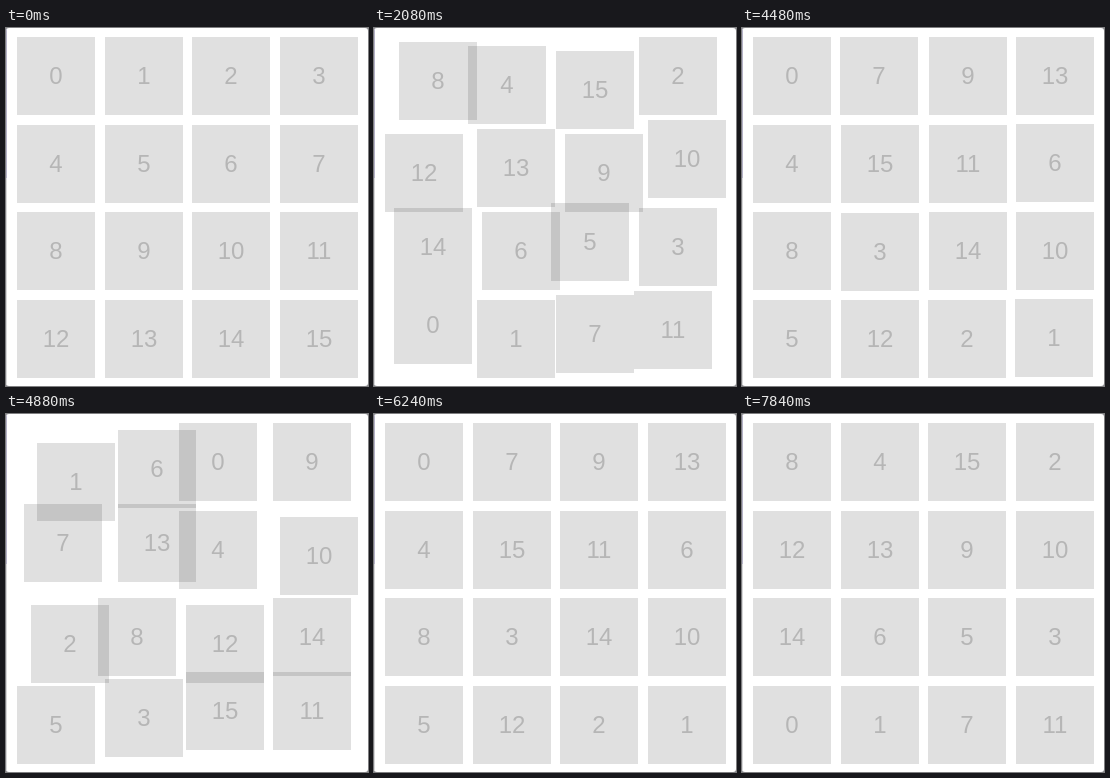
An HTML page for the animation above (8000 ms loop, 362 px wide and 358 px high).

```html
<!DOCTYPE html>
<html lang="en">
<head>
<meta charset="utf-8">
<title>Shuffling tiles</title>
<style>
  html, body {
    margin: 0;
    width: 100%;
    height: 100%;
    overflow: hidden;
    background: #8a8a8e;
  }
  #board {
    position: absolute;
    inset: 0;
    overflow: hidden;
    border-radius: 3px;
    background: #fff;
  }
  #edge {
    position: absolute;
    left: 0;
    top: 0;
    width: 1px;
    height: 100%;
    background: linear-gradient(#b4b1c6 150px, #d6d6d8 150px);
  }
  .tile {
    position: absolute;
    width: 78px;
    height: 78px;
    background: rgba(0, 0, 0, .12);
    color: rgba(0, 0, 0, .19);
    font: 24px/78px "Liberation Sans", Arial, sans-serif;
    text-align: center;
  }
</style>
</head>
<body>
<div id="board"><div id="edge"></div></div>
<script>
  const LOOP = 8000, TICK = 40;
  const PITCH = 263 / 3;

  // Tile numbers in reading order
  const sorted = [...Array(16).keys()];
  const first  = [5, 2, 0, 10, 11, 3, 14, 8, 4, 7, 13, 6, 12, 15, 1, 9];
  const second = [8, 4, 15, 2, 12, 13, 9, 10, 14, 6, 5, 3, 0, 1, 7, 11];
  const third  = [0, 7, 9, 13, 4, 15, 11, 6, 8, 3, 14, 10, 5, 12, 2, 1];
  const fourth = [1, 6, 0, 9, 7, 13, 4, 10, 2, 8, 12, 14, 5, 3, 15, 11];

  // Four shuffles, then two steps back
  const moves = [
    { start: 5,    length: 900, to: first },
    { start: 1658, length: 600, to: second },
    { start: 3020, length: 680, to: third },
    { start: 4433, length: 680, to: fourth },
    { start: 5567, length: 650, to: third },
    { start: 6967, length: 650, to: second }
  ];

  const board = document.getElementById('board');
  const tiles = sorted.map(n => {
    const tile = document.createElement('div');
    tile.className = 'tile';
    tile.textContent = n;
    return board.appendChild(tile);
  });

  // cubic-bezier(.86, 0, .07, 1), solved by bisection
  function ease(x) {
    if (x <= 0) return 0;
    if (x >= 1) return 1;
    let lo = 0, hi = 1, s;
    for (let i = 0; i < 24; i++) {
      s = (lo + hi) / 2;
      const r = 1 - s;
      const bx = 3 * s * r * r * .86 + 3 * s * s * r * .07 + s ** 3;
      if (bx < x) lo = s; else hi = s;
    }
    return s * s * (3 - 2 * s);
  }

  const mix = (a, b, p) => a + (b - a) * p;

  function draw(time) {
    let from = sorted, to = sorted, p = 0;
    for (const move of moves) {
      if (time < move.start) break;
      from = to;
      to = move.to;
      p = ease((time - move.start) / move.length);
    }
    tiles.forEach((tile, n) => {
      const a = from.indexOf(n), b = to.indexOf(n);
      const col = mix(a % 4, b % 4, p);
      const row = mix(a >> 2, b >> 2, p);
      tile.style.left = Math.round(11 + col * PITCH) + 'px';
      tile.style.top = Math.round(9 + row * PITCH) + 'px';
    });
  }

  const origin = performance.now();
  function frame() {
    const time = Math.max(0, performance.now() - origin) % LOOP;
    draw(Math.floor(time / TICK) * TICK);
    requestAnimationFrame(frame);
  }
  frame();
</script>
</body>
</html>
```
